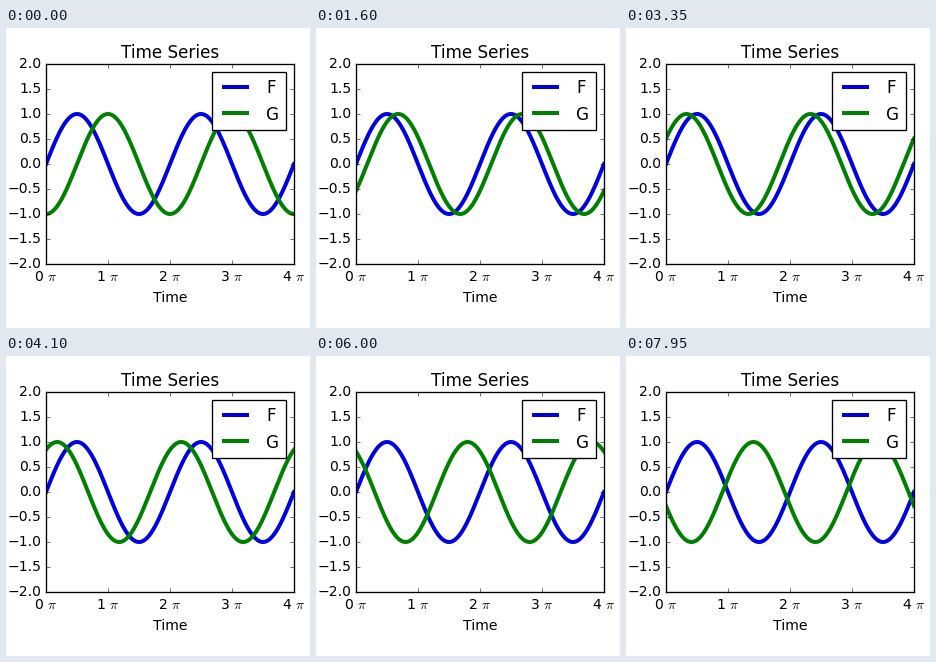
These frames come from a looping animation (304 by 300 pixels, 8000 ms). A matplotlib script:

```python
import numpy as np
import matplotlib.pyplot as plt
from matplotlib.animation import FuncAnimation

W, H, DPI = 304, 300, 80
FRAMES, INTERVAL = 160, 50
BLUE, GREEN = "#0000e0", "#008000"

plt.style.use("classic")
plt.rcParams.update({
    "font.family": "DejaVu Sans",
    "font.size": 12.6,
    "figure.facecolor": "white",
    "savefig.facecolor": "white",
    "savefig.dpi": DPI,
    "axes.linewidth": 1.2,
    "patch.linewidth": 1.2,
    "lines.linewidth": 3.6,
    "xtick.major.pad": 5.5,
})

fig = plt.figure(figsize=(W / DPI, H / DPI), dpi=DPI)
ax = fig.add_axes([40 / W, 64 / H, 248 / W, 200 / H])

x = np.linspace(0, 4, 400)
ax.plot(x, np.sin(np.pi * x), color=BLUE, label="F")
wave, = ax.plot(x, -np.cos(np.pi * x), color=GREEN, label="G")

ax.set_xlim(0, 4)
ax.set_ylim(-2, 2)
ax.set_xticks(range(5), [rf"{k} $\pi$" for k in range(5)])
ax.set_yticks(np.arange(-2, 2.1, 0.5))
ax.set_title("Time Series")
ax.set_xlabel("Time", labelpad=6)
ax.legend(loc="upper right", handleheight=0.87)


def update(i):
    """Slide G left by a hundredth of pi per frame."""
    shift = 0.5 - 0.01 * i
    wave.set_ydata(np.sin(np.pi * (x - shift)))
    return wave,


anim = FuncAnimation(fig, update, frames=FRAMES, interval=INTERVAL,
                     repeat=True, repeat_delay=0, blit=False)
plt.show()
```
